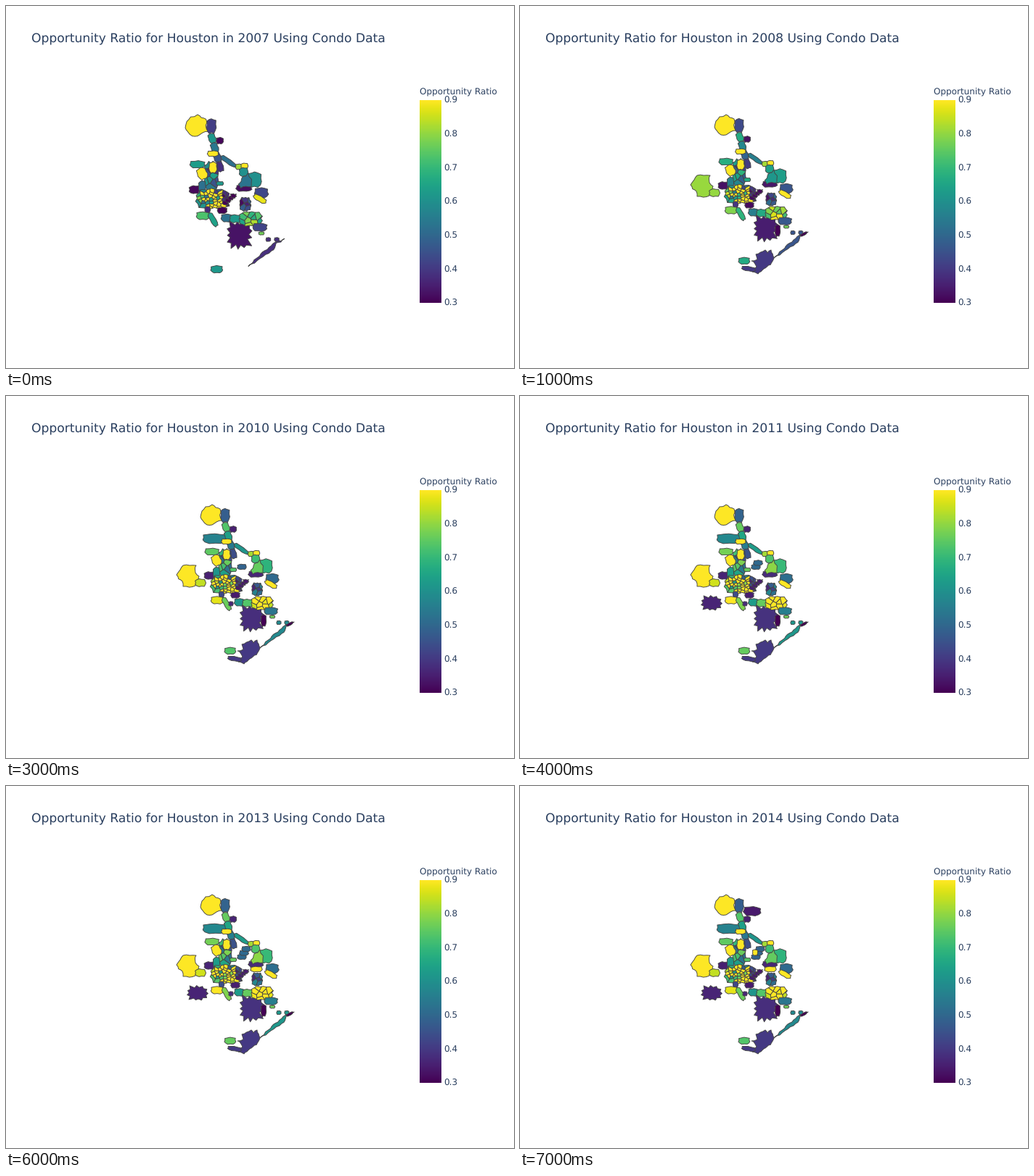
A matplotlib script that plays this animation: 700 px wide and 500 px high, repeating every 8000 ms.

```python
import numpy as np
import matplotlib.pyplot as plt
from matplotlib.animation import FuncAnimation
from matplotlib.collections import PolyCollection

W, H, DPI = 700, 500, 100
PX = 72 / DPI
INK = "#2a3f5f"
LOW, HIGH = 0.3, 0.9
FIRST, COUNT = 2007, 8

plt.rcParams["text.hinting"] = "none"
rng = np.random.default_rng(7)
cmap = plt.get_cmap("viridis")
zones = []


def add(pts, value, since=FIRST, gain=None):
    """Higher ratios grow more, unless a gain is given."""
    if gain is None:
        gain = 0.05 + 0.3 * (value - LOW)
    zones.append((np.asarray(pts), value, gain, since))


def split(a, b):
    """Points of a rough border from a up to, but without, b."""
    d = b - a
    if np.hypot(*d) < 5:
        return [a]
    mid = (a + b) / 2 + rng.uniform(-.16, .16) * np.array([-d[1], d[0]])
    return split(a, mid) + split(mid, b)


def shape(corners, value, **kw):
    pts = np.array(corners, float)
    add([p for a, b in zip(pts, np.roll(pts, -1, axis=0)) for p in split(a, b)],
        value, **kw)


def outline(x, y, w, h, tilt=0, rough=0.1, n=14):
    """A rounded box whose border goes in and out."""
    a = np.arange(n) * 2 * np.pi / n + rng.uniform(0, 0.4)
    r = (np.cos(a) ** 4 + np.sin(a) ** 4) ** -0.25
    r = r * (1 + rough * (-1) ** np.arange(n) * rng.uniform(.2, 1, n))
    u, v = r * np.cos(a) * w / 2, r * np.sin(a) * h / 2
    c, s = np.cos(np.radians(tilt)), np.sin(np.radians(tilt))
    return np.column_stack([x + c * u - s * v, y + s * u + c * v])


def blob(x, y, w, h, value, tilt=0, rough=0.1, n=14, **kw):
    add(outline(x, y, w, h, tilt, rough, n), value, **kw)


def clip(poly, p, q):
    """Keep the part of poly that is nearer to p than to q."""
    d = (poly - (p + q) / 2) @ (q - p)
    out = []
    for i in range(len(poly)):
        j = (i + 1) % len(poly)
        if d[i] <= 0:
            out.append(poly[i])
        if d[i] * d[j] < 0:
            out.append(poly[i] + (poly[j] - poly[i]) * d[i] / (d[i] - d[j]))
    return np.array(out).reshape(-1, 2)


def patchwork(x, y, w, h, n, value_at, **kw):
    """Divide an area into n cells around the points of a spiral."""
    k = np.arange(n)
    r, a = np.sqrt((k + .5) / n), k * 2.4
    seeds = np.column_stack([x + r * np.cos(a) * w / 2,
                             y + r * np.sin(a) * h / 2])
    seeds += rng.uniform(-1.2, 1.2, seeds.shape)
    edge = outline(x, y, w, h, n=22)
    for i, p in enumerate(seeds):
        cell = edge
        for j, q in enumerate(seeds):
            if i != j and len(cell):
                cell = clip(cell, p, q)
        if len(cell) > 2:
            add(cell, value_at(*p), **kw)


def mixed(low, high):
    return lambda x, y: rng.uniform(low, high)


def core_value(x, y):
    """Green in the west, yellow in the middle, dark in the east."""
    if x < 289:
        return rng.uniform(.6, .8)
    if x > 317:
        return rng.uniform(.3, .4)
    if y < 252 and x > 305:
        return rng.uniform(.38, .5)
    return .9 if rng.random() < .72 else rng.uniform(.5, .75)


# North
shape([(270, 159), (275, 153), (284, 150), (295, 156), (298, 172), (290, 174),
       (284, 178), (277, 178), (271, 172), (268, 167)], .9)
blob(302, 165, 12, 18, .41)
blob(288, 197, 32, 13, .48, since=2010)
for t in np.linspace(0, 1, 4):
    blob(303 + 10 * t, 181 + 37 * t, 9, 13, .62 - .24 * t, tilt=-20)
blob(320, 173, 23, 12, .3, since=2014)
blob(313, 184, 9, 8, .31)
blob(304, 201, 14, 7, .9)
blob(324, 211, 23, 6, .52, tilt=35)

# North-west
patchwork(302, 230, 18, 36, 10, mixed(.35, .65))
blob(284, 215, 19, 9, .63)
blob(290, 227, 12, 15, .9, tilt=-25)
blob(304, 219, 10, 14, .9)

# North-centre fills up year by year
for k in range(3):
    blob(325 + 3 * k, 236 - 5.5 * k, 12, 7, .42, since=2010 + k)
blob(324, 230, 7, 8, .9, since=2014)

# North-east
for k in range(2):
    blob(338 + 7 * k, 218 - k, 9, 7, .82 + .08 * k, gain=0)
blob(344, 225, 11, 11, .6)
blob(344, 246, 20, 8, .32)
blob(358, 235, 18, 19, .6, gain=.11)
shape([(337, 241), (350, 226), (354, 244), (340, 246)], .53, gain=.28)
blob(367, 252, 17, 13, .43)
blob(365, 260, 18, 7, .88, tilt=30)

# East
blob(345, 253, 16, 7, .9, since=2012)
patchwork(346, 267, 14, 17, 6, mixed(.3, .5))

# West
shape([(240, 240), (244, 234), (262, 234), (261, 244), (266, 249), (261, 262),
       (244, 263), (243, 256), (235, 247)], .75, since=2008)
blob(268, 258, 14, 10, .78, since=2008, gain=.08)
blob(280, 248, 13, 10, .31)
blob(290, 244, 9, 15, .52)
blob(313, 240, 9, 5, .62)

# Centre
patchwork(304, 260, 42, 25, 48, core_value)
for k in range(4):
    blob(320 + 3.5 * k, 265 - 3 * k, 7, 5, .3, rough=.25)
blob(316, 275, 12, 8, .3)
blob(297, 274, 7, 8, .37)

# South-west
blob(291, 282, 17, 10, .73)
blob(304, 287, 19, 7, .64, tilt=60)
blob(310, 287, 6, 6, .32, since=2010)
blob(264, 286, 25, 18, .36, rough=.22, n=22, since=2011, gain=0)

# South
for k in range(2):
    blob(322 + 11 * k, 285 + k, 14, 10, .52 + .1 * k)
blob(338, 307, 29, 31, .33, rough=.25, n=26)
blob(355, 310, 7, 16, .3, since=2008, gain=0)
patchwork(353, 286, 29, 18, 10, mixed(.62, .85), gain=.25)
blob(365, 297, 18, 10, .42, gain=.14)
blob(367, 305, 7, 4, .77, gain=0)

# Coast
shape([(350, 348), (366, 332), (388, 315), (397, 312), (380, 328), (365, 338)],
      .38, gain=.25)
for k in range(2):
    blob(376 + 11 * k, 313, 6, 5, .38, gain=.25)
blob(391, 315, 10, 3, .3, tilt=-30, since=2008, gain=0)
shape([(319, 352), (327, 350), (325, 343), (338, 337), (341, 341), (346, 337),
       (350, 348), (336, 363), (328, 370), (320, 367), (326, 360)],
      .4, since=2008, gain=0)
blob(315, 363, 19, 6, .4, tilt=10, since=2008, gain=0)
blob(309, 352, 15, 9, .62)

fig = plt.figure(figsize=(W / DPI, H / DPI), dpi=DPI, facecolor="white")
ax = fig.add_axes([0, 0, 1, 1])


def label(x, y, text, size):
    return ax.text(x, y, text, fontsize=size * PX, color=INK,
                   family="DejaVu Sans", va="baseline")


title = label(35, 50, "", 17.15)
label(570.5, 122, "Opportunity Ratio", 12)
ramp = np.linspace(HIGH, LOW, 280)[:, None]
ax.imshow(ramp, cmap=cmap, extent=(570, 600, 410, 130), aspect="auto",
          interpolation="nearest")
for k in range(7):
    label(603, 414.3 - k * 280 / 6, f"{LOW + k / 10:.1f}", 12)

areas = PolyCollection([], linewidths=0.9 * PX, edgecolors="#444444")
ax.add_collection(areas)
ax.set(xlim=(0, W), ylim=(H, 0))
ax.axis("off")


def fit(pts, year):
    """The first year covers less ground, so its view is closer."""
    if year > FIRST:
        return pts
    return (pts - (268, 150)) * (1.06, 1.058) + (247, 150)


def draw(i):
    year = FIRST + i
    trend = np.sin(np.pi / 2 * i / 5)  # peaks after five years
    shown = [z for z in zones if z[3] <= year]
    areas.set_verts([fit(z[0], year) for z in shown])
    levels = np.array([z[1] + z[2] * trend for z in shown])
    areas.set_facecolor(cmap((levels - LOW) / (HIGH - LOW)))
    title.set_text(f"Opportunity Ratio for Houston in {year} Using Condo Data")
    return areas, title


anim = FuncAnimation(fig, draw, frames=COUNT, interval=1000,
                     repeat=True, repeat_delay=0)
plt.show()
```
